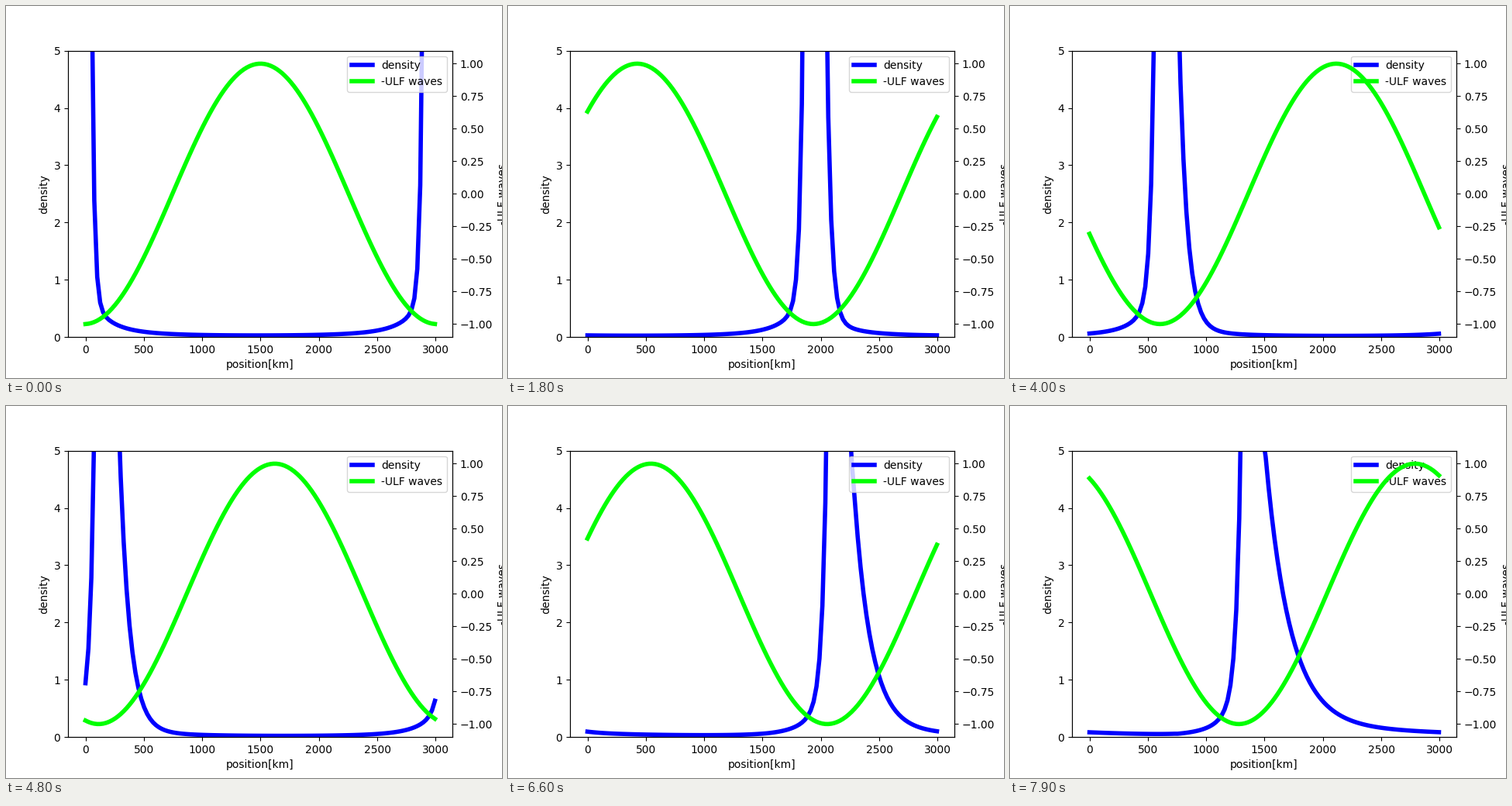
These frames come from a looping animation (640 px wide and 480 px high, 8 s). A matplotlib script:

```python
import numpy as np
import matplotlib.pyplot as plt
from matplotlib.animation import FuncAnimation

FRAMES, INTERVAL = 80, 100
CELLS = 120
DX = 25.163                     # grid step in km
WAVE = CELLS * DX               # one wavelength, the domain is periodic
PERIOD = 50                     # frames per wave period
TURN = 2 * np.pi

x = np.arange(CELLS) * DX


def trough(k):
    """Position of the wave minimum, drifting left with a slight wobble."""
    wobble = .18 * np.cos(TURN * k / PERIOD - .4)
    return -(k + wobble) / PERIOD * WAVE


def wave(k):
    return -np.cos(TURN * (x - trough(k)) / WAVE)


def density(k):
    """Broad background, plus a pulse that widens and grows a trailing wake."""
    back = 530                  # reach of the domain ahead of the trough
    u = (x - trough(k) + back) % WAVE - back

    base = .061 * np.exp(-k / 125) / (1.08 - np.cos(TURN * (u + 33) / WAVE))

    left, left_w = -123 + 1.76 * k, 22.5 + .22 * k
    right, right_w = 66 + 3.1 * k - .0135 * k**2, 21.2 * np.exp(k / 34.5)
    s = u - right
    pulse = 4.6 * np.exp(np.minimum((u - left) / left_w, -s / right_w))

    fade = 1 - (np.clip(u, 0, 2520) / 2520)**6
    wake = .25 * (k / FRAMES)**4 * np.exp(-s / (6 * right_w)) * fade
    return base + pulse + np.where(s > 0, wake, 0)


fig, ax = plt.subplots(figsize=(6.4, 4.8), dpi=100)
ax2 = ax.twinx()

line_n, = ax.plot(x, density(0), color="#0000ff", lw=4, label="density")
line_w, = ax2.plot(x, wave(0), color="#00ff00", lw=4, label="-ULF waves")

ax.set_xlim(-.05 * x[-1], 1.05 * x[-1])
ax.set_ylim(0, 5)
ax2.set_ylim(-1.1, 1.1)
ax.set_xlabel("position[km]")
ax.set_ylabel("density")
ax2.set_ylabel("-ULF waves")
ax.legend(handles=[line_n, line_w], loc="upper right")


def update(k):
    line_n.set_ydata(density(k))
    line_w.set_ydata(wave(k))
    return line_n, line_w


anim = FuncAnimation(fig, update, frames=FRAMES, interval=INTERVAL,
                     repeat=True, repeat_delay=0)
plt.show()
```
